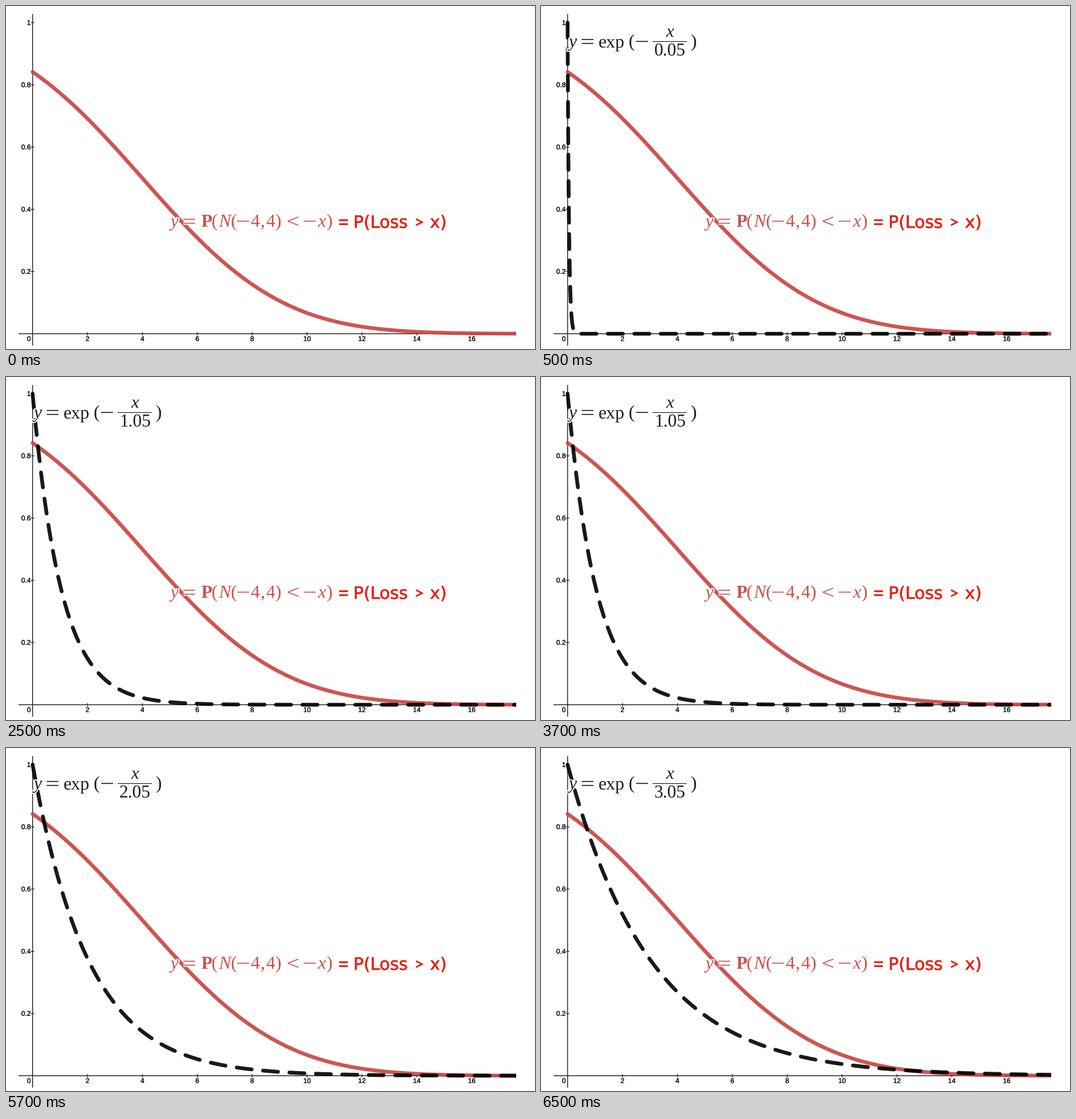
A matplotlib script for the animation above (8 s loop, 929x603 px).

```python
import math

import matplotlib.pyplot as plt
import numpy as np
from matplotlib import patheffects
from matplotlib.animation import FuncAnimation
from matplotlib.patches import Rectangle

# At 72 dpi one point is one pixel.
WIDTH, HEIGHT, DPI = 929, 603, 72
ORIGIN_X, ORIGIN_Y = 46.7, 576.2
UNIT_X, UNIT_Y = 48.2, 547
RIGHT_EDGE = 896
CURVE_WIDTH = 6.635
BLACK, RED, BRIGHT_RED = "#000000", "#c74440", "#ec1c0c"
INK, SOFT_RED, AXIS = "#1c1c1c", "#cb514d", "#222222"
FRAME_MS, LOOP_MS = 500, 8000

plt.rcParams["path.simplify"] = False
plt.rcParams["text.hinting"] = "none"

fig = plt.figure(figsize=(WIDTH / DPI, HEIGHT / DPI), dpi=DPI, facecolor="white")
ax = fig.add_axes([0, 0, 1, 1])
ax.set(xlim=(0, WIDTH), ylim=(HEIGHT, 0))
ax.axis("off")


def px(x):
    return ORIGIN_X + UNIT_X * x


def py(y):
    return ORIGIN_Y - UNIT_Y * y


def border(width, color="white"):
    return [patheffects.withStroke(linewidth=width, foreground=color)]


def stroke(xs, ys, color, width, outlined=False):
    line, = ax.plot(xs, ys, color=color, lw=width, snap=False, zorder=4,
                    solid_capstyle="butt", solid_joinstyle="miter")
    if outlined:
        line.set_path_effects(border(width + 4))
    return line


def write(x, y, text, color, size=32, family="Liberation Serif",
          outlined=False, thicken=0, **style):
    label = ax.text(x, y, text, color=color, fontsize=size, family=family,
                    va="baseline", zorder=4, **style)
    if outlined:
        label.set_path_effects(border(4))
    elif thicken:
        label.set_path_effects(border(thicken, color))
    return label


def equals(x, y, color, length=20.5, gap=7, width=1.7, outlined=False):
    return [stroke([x, x + length], [y + d, y + d], color, width, outlined)
            for d in (-gap / 2, gap / 2)]


def minus(x, y, color):
    return stroke([x, x + 21], [y, y], color, 1.7)


def draw_axes():
    stroke([22, RIGHT_EDGE], [ORIGIN_Y] * 2, AXIS, 1.5)
    stroke([ORIGIN_X] * 2, [14, 597], AXIS, 1.5)
    font = dict(color="#111111", size=12, family="Liberation Sans", thicken=0.3)
    for x in range(2, 17, 2):
        stroke([px(x)] * 2, [ORIGIN_Y - 3, ORIGIN_Y + 3], AXIS, 1.3)
        write(px(x), 589, str(x), ha="center", **font)
    for y in (0.2, 0.4, 0.6, 0.8, 1):
        stroke([ORIGIN_X - 3, ORIGIN_X + 3], [py(y)] * 2, AXIS, 1.3)
        write(43.5, py(y) + 4, f"{y:g}", ha="right", **font)
    write(43.5, 589, "0", ha="right", **font)
    for artist in [*ax.lines, *ax.texts]:
        artist.set_zorder(1)


def draw_loss_equation():
    base, middle = 388, 378.3
    write(289, base, "y", SOFT_RED, style="italic", outlined=True)
    equals(311.5, middle, SOFT_RED, outlined=True)
    write(342, base, "P", SOFT_RED, weight="bold")
    write(361, base, "(", SOFT_RED)
    write(373, base, "N", SOFT_RED, style="italic")
    write(395, base, "(", SOFT_RED)
    minus(406, middle, SOFT_RED)
    write(429, base, "4", SOFT_RED)
    write(447, base, ",", SOFT_RED)
    write(456, base, "4", SOFT_RED)
    write(473, base, ")", SOFT_RED)
    stroke([513.5, 495, 513.5], [371, middle, 385.6], SOFT_RED, 1.7)
    minus(523, middle, SOFT_RED)
    write(547, base, "x", SOFT_RED, style="italic")
    write(563, base, ")", SOFT_RED)

    sans = dict(size=30, family="DejaVu Sans", thicken=0.5)
    equals(585, 380, BRIGHT_RED, length=15.5, width=3)
    write(610, 390, "P(Loss", BRIGHT_RED, **sans)
    stroke([720, 730.5, 720], [374.5, 380, 385.5], BRIGHT_RED, 2.8)
    write(744.5, 390, "x)", BRIGHT_RED, **sans)


def draw_bound_equation():
    """Return the changing denominator and every other part of the label."""
    base, middle = 72, 62.3
    denominator = write(226.5, 86.5, "", INK, size=31.5, ha="center")
    parts = [
        write(49, base, "y", INK, style="italic", outlined=True),
        *equals(71.5, middle, INK),
        write(100.5, base, "exp", INK),
        write(153.5, base, "(", INK),
        minus(167, middle, INK),
        write(219, 54, "x", INK, size=31, style="italic"),
        stroke([196, 256], [62.5, 62.5], INK, 1.2),
        write(262.5, base, ")", INK),
    ]
    return denominator, parts


draw_axes()
draw_loss_equation()
denominator, bound_parts = draw_bound_equation()

# Sampled most densely near zero, where the bound is steepest.
xs = 18 * np.linspace(0, 1, 2000) ** 3
loss = np.array([0.5 * math.erfc((x - 4) / (4 * math.sqrt(2))) for x in xs])
curve_style = dict(lw=CURVE_WIDTH, alpha=0.9, solid_capstyle="round")
loss_line, = ax.plot(px(xs), py(loss), color=RED, zorder=2, **curve_style)
bound_line, = ax.plot([], [], color=BLACK, zorder=3, linestyle=(0, (4, 3)),
                      dash_capstyle="round", dash_joinstyle="round",
                      **curve_style)
plot_area = Rectangle((0, 0), RIGHT_EDGE, HEIGHT, transform=ax.transData)
for line in (loss_line, bound_line):
    line.set_clip_path(plot_area)


def update(frame):
    step = (frame + 3) // 4  # the scale grows by one every two seconds
    visible = step > 0
    for artist in (bound_line, denominator, *bound_parts):
        artist.set_visible(visible)
    if visible:
        scale = step - 0.95
        bound_line.set_data(px(xs), py(np.exp(-xs / scale)))
        denominator.set_text(f"{scale:.2f}")
    return [bound_line, denominator, *bound_parts]


animation = FuncAnimation(fig, update, frames=LOOP_MS // FRAME_MS,
                          interval=FRAME_MS, repeat=True, repeat_delay=0)
plt.show()
```
